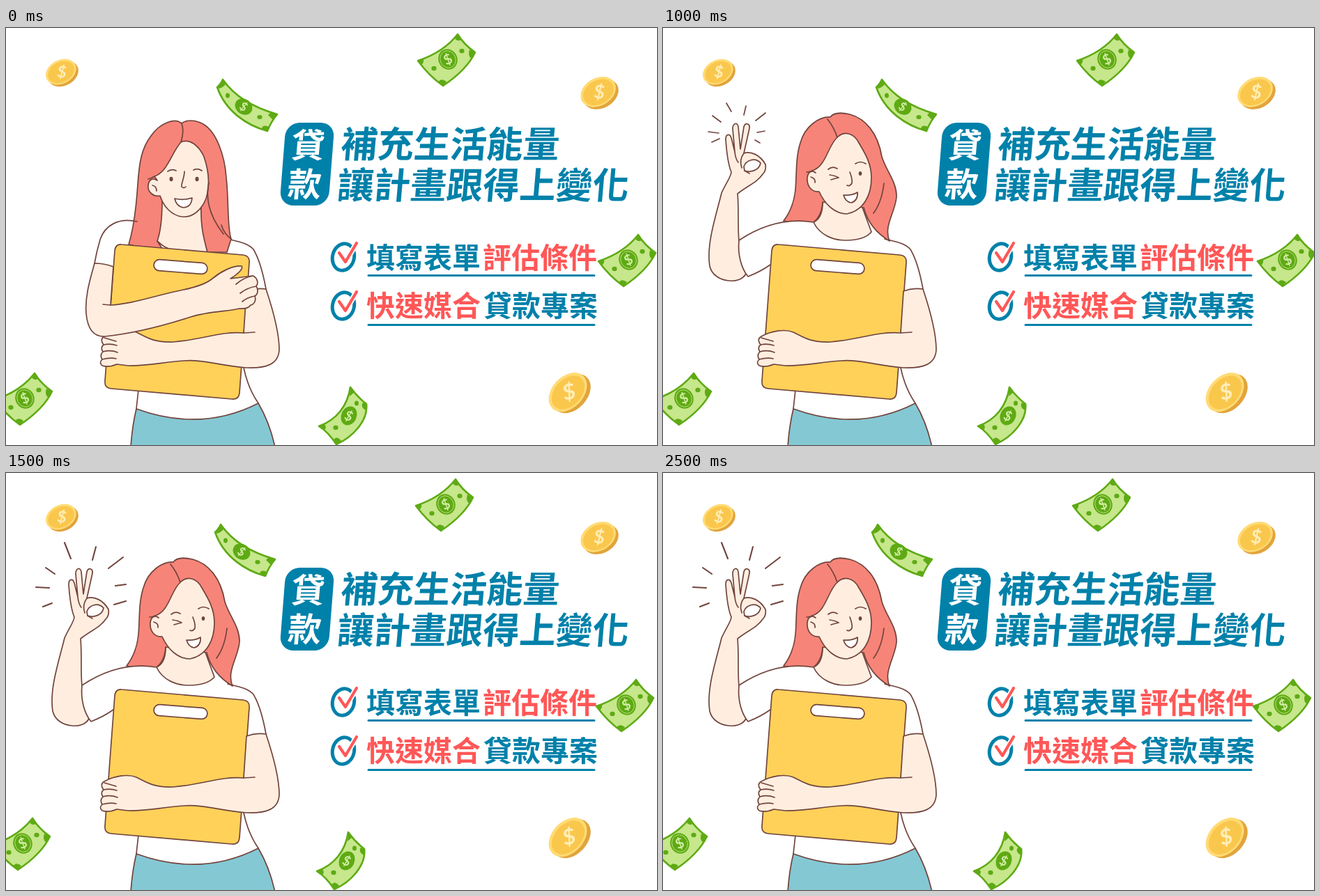
Recreate the animation shown at these times as an HTML page. Size 934x599 px, loop 3000 ms.

```html
<!DOCTYPE html>
<html lang="zh-Hant">
<head>
<meta charset="utf-8">
<style>
html, body { margin: 0; width: 100%; height: 100%; overflow: hidden; background: #fff; }
svg { display: block; width: 934px; height: 599px; }
text { font-family: "Noto Sans CJK TC", "Noto Sans CJK", sans-serif; font-weight: 700; }
.dollar { font-family: Lato, sans-serif; text-anchor: middle; }
.line { fill: none; stroke: #71443d; stroke-width: 1.7; stroke-linecap: round; stroke-linejoin: round; }
.hair { fill: #f78478; }
.skin { fill: #ffeee0; }
.white { fill: #fff; }
.dot { fill: #71443d; stroke: none; }
.teal { fill: #0081aa; }
.red { fill: #ff5757; }
.paper { fill: #c6e78b; stroke: #5eaa14; stroke-width: 2.6; stroke-linejoin: round; }
.ink { fill: #5eaa14; }
.mint { fill: #d3eda3; }
</style>
</head>
<body>
<svg viewBox="0 0 934 599">
  <defs>
    <g id="bill">
      <path class="paper" d="M591 47C612 40 634 27 648 9C654 19 663 28 673 35C664 54 645 71 627 83C613 73 602 62 591 47Z"/>
      <path class="ink" d="M591 47l8-3q1 6-3 9zM648 9l5 8q-6 3-9-2zM673 35l-5 9q-6-4-3-13zM627 83l-7-5q4-7 12-1z"/>
      <ellipse class="ink" cx="614" cy="58" rx="3.6" ry="3.2"/>
      <ellipse class="ink" cx="654" cy="33" rx="3.6" ry="3.2"/>
      <g transform="translate(634 45) rotate(-24)">
        <ellipse class="ink" rx="13.5" ry="15"/>
        <ellipse rx="11" ry="12.500" fill="none" stroke="#c6e78b" stroke-width=".8"/>
        <text class="dollar mint" y="7" font-size="20">$</text>
      </g>
    </g>
    <g id="coin">
      <ellipse cx="1" cy="2.5" rx="23" ry="17" fill="#e2a43c"/>
      <ellipse cx="-.5" cy="-1.500" rx="23" ry="17" fill="#ffdb74"/>
      <ellipse cx="-.5" cy="-1" rx="20" ry="14.500" fill="#fac74d"/>
      <text class="dollar" y="7" font-size="23" fill="#ffeeb8" transform="rotate(38)">$</text>
    </g>
    <g id="tick">
      <ellipse cx="484" cy="329" rx="15.5" ry="19.500" fill="none" stroke="#0081aa" stroke-width="5" transform="rotate(14 484 329)"/>
      <g fill="none" stroke-linecap="round" stroke-linejoin="round">
        <path d="M478 323L487 336L503 309" stroke="#fff" stroke-width="8"/>
        <path d="M478 323L487 336L503 309" stroke="#ff5757" stroke-width="4.200"/>
      </g>
    </g>
  </defs>

  <use href="#coin" transform="translate(80 64) rotate(-28)"/>
  <use href="#coin" transform="translate(851 93) rotate(-30) scale(1.17)"/>
  <use href="#coin" transform="translate(808 524) rotate(-47) scale(1.4 1.32)"/>

  <!-- skirt and shirt -->
  <g class="line">
    <path fill="#84c8d4" d="M187 547Q280 581 362 539Q378 566 386 602H179Q181 572 187 547Z"/>
    <path d="M190 520L187 547M341 488Q347 517 362 539M318 303C334 307 347 309 355 318C364 333 369 353 373 375"/>
  </g>

  <!-- upright head -->
  <g class="line" data-steps="0">
    <path class="hair" d="M252 137C243 129 222 135 208 155C194 173 191 195 189 225C187 255 184 285 176 311L230 322H317L323 303C317 285 320 250 316 215C314 185 303 150 283 138C270 131 258 132 252 137Z"/>
    <path class="skin" d="M224 248C224 275 222 292 217 306L240 326H290C283 300 279 285 280 252Z"/>
    <path class="white" d="M217 306Q230 320 258 322L230 326Z"/>
    <path class="skin" d="M251 164C263 158 277 169 284 185C291 205 293 225 287 245C280 263 266 273 252 271C238 269 226 257 221 241C212 243 203 236 204 226C205 217 211 215 217 219L213 213C232 207 238 178 251 164Z"/>
    <path d="M252 137Q256 148 251 164M204 217Q209 216 213 213M210 226Q216 227 216 234M309 283Q313 296 323 303M291 222Q283 259 312 296"/>
    <path d="M232 206Q238 202 244 205M269 204Q275 201 281 205M256 206C256 215 251 224 252 228Q255 231 258 228"/>
    <path class="white" d="M242 245Q255 248 267 244Q266 257 255 258Q245 257 242 245Z"/>
    <ellipse class="dot" cx="237" cy="217" rx="2.500" ry="3.200"/>
    <ellipse class="dot" cx="274" cy="217" rx="2.500" ry="3.200"/>
  </g>

  <!-- tilted head -->
  <g class="line" data-steps="12345">
    <path class="skin" d="M229 245C230 265 225 275 216 279C225 298 245 305 262 305C280 305 293 300 299 293L285 255Z"/>
    <path class="hair" d="M240 128C225 127 204 140 197 165C190 187 192 210 190 232C188 252 180 268 173 277C185 281 203 280 216 279Q228 270 229 250L288 258C294 282 310 297 325 306C316 285 333 265 335 243C336 222 320 205 314 185C308 150 290 130 268 124C255 121 244 122 240 128Z"/>
    <path class="skin" d="M250 157C260 147 274 151 281 165C290 180 299 195 299 215C299 240 288 262 264 267C248 267 233 255 224 235C214 236 206 228 207 215C208 206 214 204 219 208L214 205C234 199 236 170 250 157Z"/>
    <path d="M236 131Q245 142 250 157M206 207Q210 207 214 205M212 214Q219 216 218 222M317 223Q314 250 302 266M268 207Q272 217 271 223Q268 228 264 226"/>
  </g>
  <path class="line" data-steps="1" d="M238 216Q246 211 253 217M278 210Q286 205 293 211M236 203Q242 197 249 200M274 196Q281 192 288 195M257 241Q270 249 281 240"/>
  <g class="line" data-steps="2345">
    <path d="M239 211Q247 212 252 215Q247 216 241 218M237 203Q243 198 250 202M276 195Q283 190 291 195"/>
    <ellipse class="dot" cx="283" cy="209" rx="2.300" ry="3"/>
    <path class="white" d="M259 240Q271 241 279 236Q280 248 270 251Q262 250 259 240Z"/>
  </g>

  <!-- raised arm with OK sign -->
  <g class="line" data-steps="2345">
    <path class="skin" d="M84 237C90 223 97 215 98 207C93 195 91 175 90 160C90 152 96 151 98 158L103 178L100 145C100 136 107 135 108 142L111 174L116 142C118 135 125 137 124 144L116 180C126 176 140 183 147 196C148 202 146 207 143 210C135 222 122 226 107 238C109 260 107 290 109 305C110 330 116 345 119 353C114 362 103 364 95 363C82 362 70 355 67 342C62 310 76 270 84 237Z"/>
    <path class="white" d="M116 199C119 190 132 185 140 194C138 204 127 208 117 205Z"/>
    <path d="M103 178Q104 188 108 193M116 180Q109 189 113 201M117 205L124 209"/>
    <path class="white" d="M216 279C180 273 145 281 109 305C107 325 112 345 122 357Q140 350 154 340"/>
  </g>
  <path class="line" data-steps="24" d="M91 108L98 120M119 112L116 125M71 126L83 135M147 122L133 133M65 149L80 151M146 148L135 150M70 164L81 159M139 165L132 161"/>
  <path class="line" data-steps="35" d="M84 100L93 123M129 106L124 125M57 136L70 145M168 121L147 137M43 164L62 165M172 160L157 162M53 192L66 187M172 184L155 189" style="stroke-width:2.1"/>

  <!-- yellow board -->
  <g class="line">
    <path fill="#ffd159" d="M166 311L340 326Q350 327 349 337L335 524Q334 534 324 533L151 518Q141 517 142 507L156 320Q157 310 166 311Z"/>
    <rect class="white" x="212" y="335" width="77" height="16" rx="8" transform="rotate(4.5 250 343)"/>
  </g>

  <!-- supporting arm -->
  <g class="line">
    <path class="skin" d="M345 378Q359 373 373 375C383 405 392 440 392 462C391 484 372 489 345 488C305 485 285 476 255 478C225 480 200 486 175 485L159 483Q147 488 138 485Q133 481 138 476Q134 470 139 465Q135 459 140 455Q134 447 141 443C155 435 175 432 187 437C200 443 210 452 240 451C280 448 310 435 341 438Z"/>
    <path d="M341 438L357 437M141 445L158 450M140 455Q150 453 159 456M139 465Q150 462 160 466M138 476Q150 473 158 475"/>
  </g>

  <!-- folded arm -->
  <g class="line" data-steps="01">
    <path d="M188 278C162 272 142 283 135 304Q130 321 127 338"/>
    <path class="skin" d="M127 338C121 360 113 385 115 410C117 432 125 444 142 443C180 439 225 428 265 415C290 407 320 407 335 403Q347 404 351 398C357 397 359 390 357 385C362 382 362 375 359 371C363 366 360 358 354 356L322 360C332 354 341 346 338 342C325 341 308 350 296 360C288 367 275 372 250 377C215 384 180 397 150 398L154 343Q141 338 127 338Z"/>
    <path d="M139 397L150 398M354 356Q340 359 330 368M359 371Q346 373 336 381M357 385Q346 387 339 393"/>
  </g>

  <!-- drifting bills -->
  <g id="bills">
    <use href="#bill"/>
    <use href="#bill" x="259" y="288"/>
    <use href="#bill" x="-607" y="487"/>
    <path class="paper" d="M311 74C328 98 352 113 389 124Q380 135 375 148C346 140 315 120 303 85Q308 81 311 74Z"/>
    <path class="ink" d="M311 74l4 7q-4 5-10 6l-1-4zM389 124l-6 8-7-7 4-4zM375 148l-8-3q1-7 10-3z"/>
    <ellipse class="ink" cx="318" cy="97" rx="3" ry="3.400"/>
    <ellipse class="ink" cx="364" cy="128" rx="3.600" ry="3"/>
    <g transform="translate(341 113) rotate(35)">
      <ellipse class="ink" rx="13" ry="11"/>
      <text class="dollar mint" y="6" font-size="17">$</text>
    </g>
    <path class="paper" d="M449 572C474 563 490 543 494 516Q504 530 517 540C520 564 497 588 474 598Q462 580 449 572Z"/>
    <path class="ink" d="M449 572l8-3q4 6-1 9zM494 516l5 8-6 5zM517 540l-1 9q-8-5-4-11zM474 598l-4-7q5-6 11 2z"/>
    <ellipse class="ink" cx="473" cy="574" rx="3.600" ry="3.200"/>
    <ellipse class="ink" cx="503" cy="539" rx="3" ry="3.500"/>
    <g transform="translate(492 557) rotate(25)">
      <ellipse class="ink" rx="11" ry="14"/>
      <text class="dollar mint" y="7" font-size="19">$</text>
    </g>
  </g>

  <!-- headline -->
  <rect class="teal" x="398" y="136" width="70" height="119" rx="20" transform="translate(432 195.500) skewX(-4.500) translate(-433 -195.500)"/>
  <g transform="translate(427 242) skewX(-5)" font-size="48" fill="#fff" text-anchor="middle">
    <text y="-56">貸</text>
    <text>款</text>
  </g>
  <g class="teal" transform="translate(474 245) skewX(-5)" font-size="52.300">
    <text y="-59">補充生活能量</text>
    <text>讓計畫跟得上變化</text>
  </g>

  <!-- checklist -->
  <use href="#tick"/>
  <use href="#tick" y="70"/>
  <g font-size="41">
    <text class="teal" x="517" y="344.500">填寫表單</text>
    <text class="red" x="684" y="344.500">評估條件</text>
    <text class="red" x="517" y="414">快速媒合</text>
    <text class="teal" x="685" y="414">貸款專案</text>
  </g>
  <path d="M520 355.500H844M520 426.500H844" stroke="#0081aa" stroke-width="3" stroke-linecap="round"/>
</svg>
<script>
const STEP = 500, STEPS = 6;
const poses = document.querySelectorAll('[data-steps]');
const bills = document.getElementById('bills');

function draw(now) {
  const step = Math.floor(now / STEP) % STEPS;
  for (const pose of poses) {
    pose.style.display = pose.dataset.steps.includes(step) ? '' : 'none';
  }
  const drift = step === 0 ? 0 : step % 2 ? -3 : 3;
  bills.setAttribute('transform', `translate(${drift} 0)`);
}

const start = performance.now();
function tick() {
  draw(performance.now() - start);
  requestAnimationFrame(tick);
}
tick();
</script>
</body>
</html>
```
